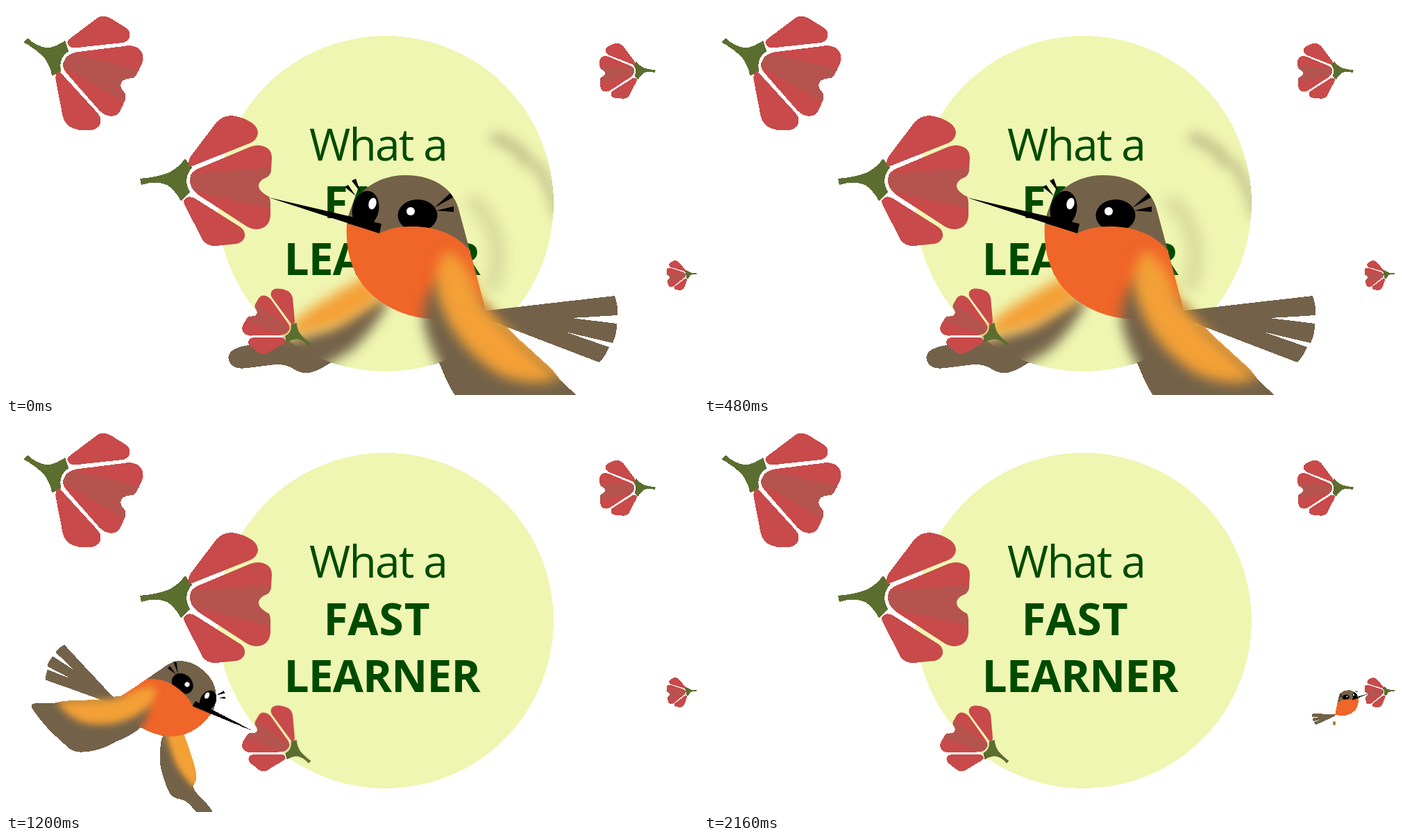
Recreate the animation shown at these times as an HTML page. Size 997 by 561 pixels, loop 2.24 s.

```html
<!DOCTYPE html>
<html lang="en">
<head>
<meta charset="utf-8">
<title>What a fast learner</title>
<style>
  html, body { margin: 0; width: 100%; height: 100%; overflow: hidden; background: #fff; }
  svg { display: block; width: 997px; height: 561px; }
  text { font: 64px "Open Sans", "Noto Sans", sans-serif; fill: #004b00; }
  .bold { font-weight: 700; }
  .brown { fill: #736249; }
  .gold { fill: #f3a036; }
  .petal { fill: #c84a4a; }
  .ghost { fill: none; stroke: #736249; stroke-linecap: round; }
</style>
</head>
<body>
<svg viewBox="0 0 997 561">
  <defs>
    <!-- Soft edges survive only on top of the disc; elsewhere alpha is all or nothing. -->
    <filter id="hard" filterUnits="userSpaceOnUse" x="0" y="0" width="997" height="561" color-interpolation-filters="sRGB">
      <feComponentTransfer><feFuncA type="discrete" tableValues="0 1"/></feComponentTransfer>
    </filter>
    <filter id="soft" filterUnits="userSpaceOnUse" x="250" y="20" width="720" height="680" color-interpolation-filters="sRGB">
      <feGaussianBlur id="blur" stdDeviation="4.5"/>
    </filter>
    <filter id="softer" filterUnits="userSpaceOnUse" x="250" y="20" width="720" height="680" color-interpolation-filters="sRGB">
      <feGaussianBlur stdDeviation="9"/>
    </filter>

    <g id="flower">
      <path fill="#5b6e2f" d="M193 249Q216 247 233 241Q248 234 258 220L268 233Q254 250 265 268L252 281Q243 265 232 258Q214 251 195 258Z"/>
      <path class="petal" d="M264 231Q261 225 266 217L303 168Q312 158 325 158Q342 160 355 169Q363 175 363 184Q361 194 351 198L268 231Z"/>
      <path class="petal" d="M268 241Q272 236 283 232L352 203Q367 198 378 206Q383 211 383 219L382 237Q381 246 371 249Q361 255 365 264Q370 271 379 275Q381 279 381 285V303Q379 318 367 321Q358 324 347 318L281 275Q264 264 265 250Q265 245 268 241Z"/>
      <path fill="#b5544f" d="M267 242L382 233V237Q381 246 371 249Q361 255 365 264Q370 271 379 275L381 292L271 267Q262 255 267 242Z"/>
      <path class="petal" d="M257 279Q264 272 273 278L338 319Q345 324 344 333Q341 341 332 343L302 346Q289 346 283 337L258 288Q255 283 257 279Z"/>
    </g>
  </defs>

  <g filter="url(#hard)">
    <circle cx="546.8" cy="285" r="242" fill="#eff6b1"/>
    <text x="437" y="223" letter-spacing="-1.8">What a</text>
    <text class="bold" x="457.5" y="306" letter-spacing="1">FAST</text>
    <text class="bold" x="400.5" y="388" letter-spacing="-.9">LEARNER</text>

    <g id="bird">
      <g class="up">
        <g filter="url(#soft)">
          <path class="brown" d="M526 76Q502 104 494 130Q480 165 480 208Q474 170 452 155Q446 180 457 232Q440 202 421 203Q424 250 449 280Q460 310 488 328L560 290L544 254L532 197Z"/>
        </g>
        <path class="gold" filter="url(#softer)" d="M526 172Q490 195 484 245Q482 285 505 310L545 285L536 215Z"/>
      </g>
      <g class="down">
        <g class="ghost" filter="url(#softer)">
          <path d="M705 190Q742 203 750 225" stroke-width="15" opacity=".42"/>
          <path d="M763 228Q786 258 794 300" stroke-width="12" opacity=".42"/>
          <path d="M676 285Q722 330 702 400" stroke-width="24" opacity=".17"/>
        </g>
        <path class="brown" filter="url(#softer)" d="M318 498L345 489L398 484L470 462L530 425L552 418L544 440Q515 485 492 500L465 516Q440 534 422 530Q410 516 395 516L333 524Q315 520 318 498Z"/>
        <path class="gold" filter="url(#softer)" d="M525 385L452 428Q412 452 402 476Q440 476 485 458L540 425Z"/>
      </g>

      <path class="brown" d="M686 440L877 418Q882 432 881 446L815 450L880 458Q880 474 874 486L806 470L869 492Q864 504 855 514L696 453Z"/>
      <path class="brown" d="M491 325C490 275 530 244 575 244C620 244 647 267 653 296L668 352L600 380Z"/>
      <ellipse cx="518" cy="293" rx="19" ry="26.5" transform="rotate(12 518 293)"/>
      <ellipse cx="593" cy="302" rx="28.5" ry="23"/>
      <ellipse cx="528" cy="285" rx="5.5" ry="8.5" transform="rotate(14 528 285)" fill="#fff"/>
      <circle cx="583" cy="296" r="6" fill="#fff"/>
      <path d="M617 291L640 270L644 276ZM620 295L645 289V297ZM511 269L498 252L504 249ZM504 274L488 261L493 258Z"/>
      <path fill="#f06528" d="M491 314C488 360 503 402 541 427C580 455 640 460 691 438L668 352C645 325 610 317 582 318C565 318 550 322 540 327Z"/>
      <path d="M378 276L541 314L538 328Z"/>

      <g class="up">
        <g filter="url(#soft)">
          <path class="brown" d="M862 112Q870 140 862 160Q850 200 824 264Q846 244 874 241Q868 272 808 313Q824 312 842 322Q820 352 768 371Q735 392 697 389L640 372L685 311L772 217L818 166Z"/>
        </g>
        <path class="gold" filter="url(#softer)" d="M798 212Q800 260 782 295Q755 335 706 354L625 376Q655 340 690 309L770 220Z"/>
      </g>
      <g class="down">
        <path class="brown" filter="url(#softer)" d="M628 390Q597 420 602 460Q612 500 630 525Q650 575 690 604L745 560L700 440Z"/>
        <path class="brown" filter="url(#soft)" d="M640 430L692 446L822 561L848 584Q790 606 700 604Q650 575 634 525Z"/>
        <path class="gold" filter="url(#softer)" d="M636 352Q606 385 630 440Q652 494 708 530Q755 552 798 537L722 466L684 425Q668 370 636 352Z"/>
      </g>
      <ellipse id="speck" cx="703" cy="510" rx="14" ry="16" fill="#b58040"/>
    </g>

    <use href="#flower" transform="translate(83.5 79.5) rotate(26) scale(.885 -.885) translate(-265 -250)"/>
    <use href="#flower"/>
    <use href="#flower" transform="translate(407.3 468) rotate(32) scale(-.52 .52) translate(-265 -250)"/>
    <use href="#flower" transform="translate(905.3 92.8) scale(-.425 .425) translate(-265 -250)"/>
    <use href="#flower" transform="translate(979 387) rotate(-5) scale(-.229 .229) translate(-265 -250)"/>
  </g>
</svg>
<script>
  const STEP = 80, STEPS = 28;
  // Each stop: first step, position of the near eye, turn, scale, mirrored.
  const stops = [
    { from: 0, x: 583, y: 296, turn: 0, size: 1, flip: 1 },
    { from: 8, x: 255, y: 150, turn: 23, size: .585, flip: 1 },
    { from: 15, x: 261, y: 377, turn: 40.5, size: .585, flip: -1 },
    { from: 22, x: 926.5, y: 394.5, turn: -3.5, size: .174, flip: -1 }
  ];
  const bird = document.getElementById('bird');
  const blur = document.getElementById('blur');
  const speck = document.getElementById('speck');
  const ups = document.querySelectorAll('.up');
  const downs = document.querySelectorAll('.down');
  const show = (el, on) => { el.style.display = on ? '' : 'none'; };

  function draw(step) {
    const stop = stops.filter(s => s.from <= step).pop();
    const tiny = stop.size < .2;
    const up = (step % 2 === 0) !== (step < 8);
    bird.setAttribute('transform',
      `translate(${stop.x} ${stop.y}) rotate(${stop.turn}) ` +
      `scale(${stop.flip * stop.size} ${stop.size}) translate(-583 -296)`);
    // The blur shrinks more slowly than the bird.
    blur.setAttribute('stdDeviation', 4.5 / Math.sqrt(stop.size));
    ups.forEach(el => show(el, up));
    downs.forEach(el => show(el, !up && !tiny));
    show(speck, !up && tiny);
  }

  const start = performance.now();
  let last = -1;
  function tick() {
    const step = Math.floor((performance.now() - start) / STEP) % STEPS;
    if (step !== last) draw(last = step);
    requestAnimationFrame(tick);
  }
  tick();
</script>
</body>
</html>
```
